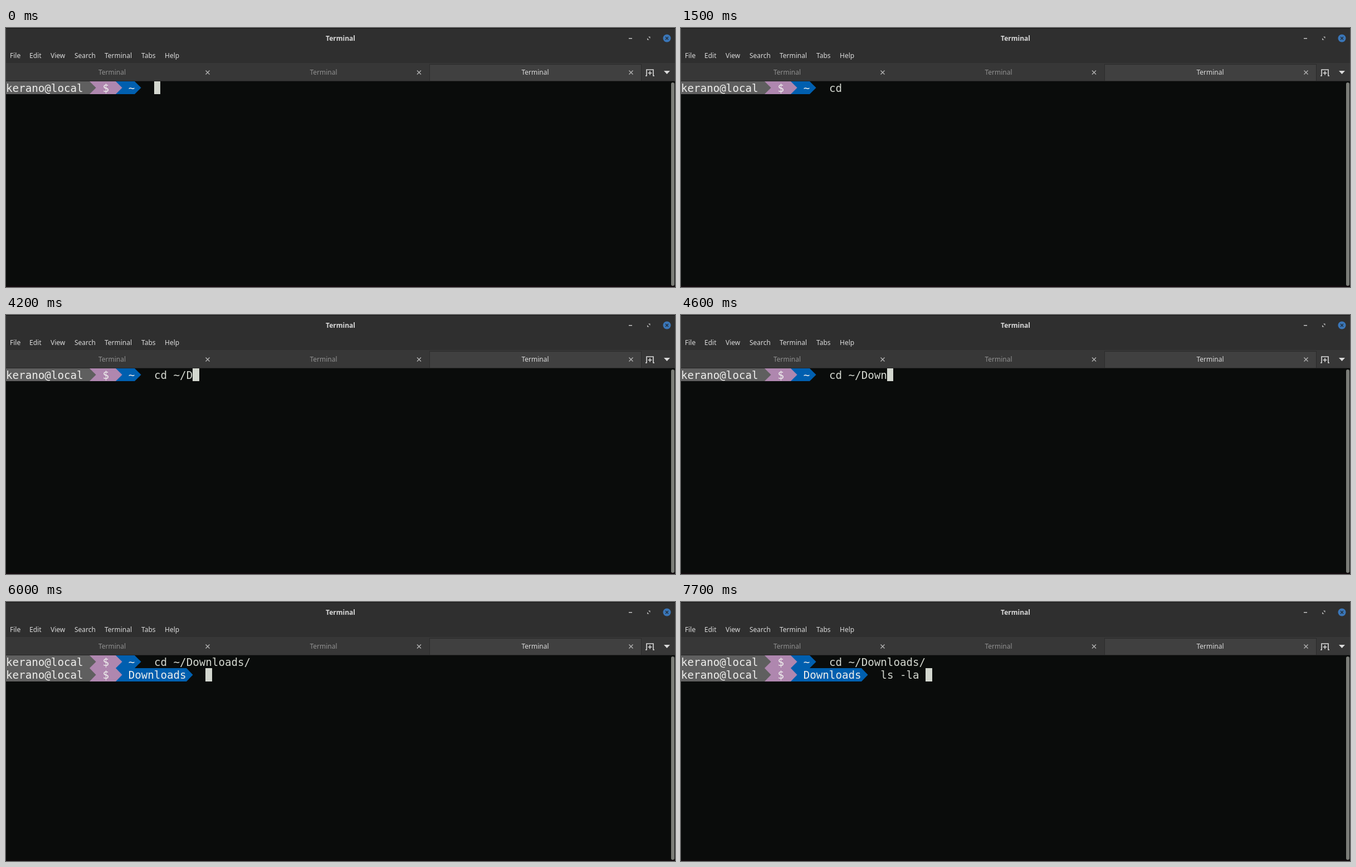
Write an HTML page with a canvas that moves like this. It is 1201 by 466 pixels and loops after 8000 ms.

```html
<!DOCTYPE html>
<html lang="en">
<head>
<meta charset="utf-8">
<title>Terminal</title>
<style>
  html, body { margin: 0; width: 100%; height: 100%; overflow: hidden; background: #0a0c0b; }
  canvas { display: block; }
</style>
</head>
<body>
<canvas id="stage" width="1201" height="466"></canvas>
<script>
const ctx = document.getElementById('stage').getContext('2d');
const LOOP = 8000;
const UI = '12px "Noto Sans", "Open Sans", sans-serif';
const MONO = '19.2px "DejaVu Sans Mono", monospace';
const CELL = 11.56, ROW = 23.4, TOP = 96;
const FG = '#d3d7cf', GRAY = '#5f5f5f', PINK = '#af87af', BLUE = '#005faf';

// [start ms, typed text, cursor state, glyph still under the cursor]
const firstLine = [
  [0, '', 1], [500, '', 1, 'c'], [600, 'c', 1], [700, 'c', 1, 'd'], [800, 'cd', 1],
  [900, 'cd ', 1], [1500, 'cd ', 0], [2100, 'cd ~', 1], [3200, 'cd ~', 0],
  [3700, 'cd ~/', 1], [4200, 'cd ~/D', 1], [4400, 'cd ~/Do', 1],
  [4500, 'cd ~/Dow', 1], [4600, 'cd ~/Down', 1], [5000, 'cd ~/Downl', 1],
  [5100, 'cd ~/Downlo', 1], [5400, 'cd ~/Downloads/', 1], [5900, 'cd ~/Downloads/', 0]
];
const secondLine = [
  [6000, '', 1], [6500, '', 0], [7100, 'l', 1, 's'], [7200, 'ls', 1],
  [7300, 'ls -', 1], [7400, 'ls -l', 1], [7500, 'ls -la', 1], [7700, 'ls -la ', 1]
];

function rect(x, y, w, h, color) {
  ctx.fillStyle = color;
  ctx.fillRect(x, y, w, h);
}

function label(text, x, y, color, font = UI, align = 'left') {
  ctx.font = font;
  ctx.textAlign = align;
  ctx.fillStyle = color;
  ctx.fillText(text, x, y);
}

function polygon(color, ...points) {
  ctx.fillStyle = color;
  ctx.beginPath();
  points.forEach(([x, y]) => ctx.lineTo(x, y));
  ctx.fill();
}

function lines(color, width, ...paths) {
  ctx.strokeStyle = color;
  ctx.lineWidth = width;
  ctx.beginPath();
  for (const [start, ...rest] of paths) {
    ctx.moveTo(...start);
    rest.forEach(p => ctx.lineTo(...p));
  }
  ctx.stroke();
}

function cross(x, y, r, color, width) {
  lines(color, width, [[x - r, y - r], [x + r, y + r]], [[x + r, y - r], [x - r, y + r]]);
}

function disc(x, y, r, color) {
  ctx.fillStyle = color;
  ctx.beginPath();
  ctx.arc(x, y, r, 0, Math.PI * 2);
  ctx.fill();
}

function drawWindow() {
  rect(0, 0, 1201, 466, '#0a0c0b');
  rect(0, 0, 1201, 63, '#2f2f2f');
  rect(0, 0, 1201, 1, '#141414');
  label('Terminal', 600.5, 23, '#dadada', 'bold ' + UI, 'center');

  const menu = { File: 7, Edit: 42, View: 80, Search: 123, Terminal: 177, Tabs: 243, Help: 285 };
  for (const [name, x] of Object.entries(menu)) label(name, x, 54, '#dadada');

  rect(1118, 18, 6, 1.5, '#c8c8c8');
  polygon('#b8b8b8', [1153, 15.5], [1156.5, 15.5], [1156.5, 19]);
  polygon('#b8b8b8', [1151, 18], [1154.5, 21.5], [1151, 21.5]);
  disc(1186.5, 18.5, 7, '#3a76b8');
  cross(1186.5, 18.5, 2.5, '#23313f', 1.5);

  rect(0, 63, 1201, 33, '#373737');
  rect(760, 65, 381, 30, '#2b2b2b');
  rect(761, 66, 379, 29, '#404040');
  rect(0, 95, 1201, 1, '#262626');
  [[190.5, 362], [570, 741.5], [950, 1122]].forEach(([x, closeX], i) => {
    label('Terminal', x, 84, i === 2 ? '#dadada' : '#909090', UI, 'center');
    cross(closeX, 80, 3.5, '#b4b4b4', 1.4);
  });

  lines('#dadada', 1.6,
    [[1148, 86], [1150, 86], [1150, 75], [1162, 75], [1162, 86], [1164, 86]],
    [[1156, 77.5], [1156, 84.5]], [[1152.5, 81], [1159.5, 81]]);
  polygon('#dadada', [1181, 77], [1192, 77], [1186.5, 83]);

  ctx.fillStyle = '#7b7d78';
  ctx.beginPath();
  ctx.roundRect(1194, 98, 6, 366, 3);
  ctx.fill();
  rect(0, 464, 1201, 2, '#12090d');
}

const rowTop = row => Math.round(TOP + row * ROW);
const rowHeight = row => rowTop(row + 1) - rowTop(row);

function mono(text, col, row, color) {
  label(text, col * CELL, rowTop(row) + 19, color, MONO);
}

function segment(text, col, width, row, color) {
  const y = rowTop(row), h = rowHeight(row);
  const left = Math.round(col * CELL), right = Math.round((col + width) * CELL);
  rect(left, y, right - left, h, color);
  polygon(color, [right, y], [right + CELL, y + h / 2], [right, y + h]);
}

function prompt(folder, row) {
  const width = folder.length + 3;
  segment('', 17, width - 1, row, BLUE);
  segment('', 13, 4, row, PINK);
  segment('', 0, 13, row, GRAY);
  mono('kerano@local', 0, row, '#eeeeec');
  mono('$', 15, row, '#eeeeec');
  mono(folder, 19, row, '#eeeeec');
  return 19 + folder.length + 3;
}

function cursor(col, row) {
  const left = Math.round(col * CELL);
  rect(left, rowTop(row), Math.round((col + 1) * CELL) - left, rowHeight(row), FG);
}

function commandLine(folder, row, steps, time) {
  const [, text, cursorOn, under] = steps.findLast(([start]) => start <= time);
  const col = prompt(folder, row);
  mono(text, col, row, FG);
  if (!cursorOn) return;
  cursor(col + text.length, row);
  if (under) mono(under, col + text.length, row, '#e6e8e3');
}

function frame() {
  const time = performance.now() % LOOP;
  drawWindow();
  commandLine('~', 0, firstLine, time);
  if (time >= 6000) commandLine('Downloads', 1, secondLine, time);
  else if (time >= 5900) cursor(0, 1);
  requestAnimationFrame(frame);
}
frame();
</script>
</body>
</html>
```
